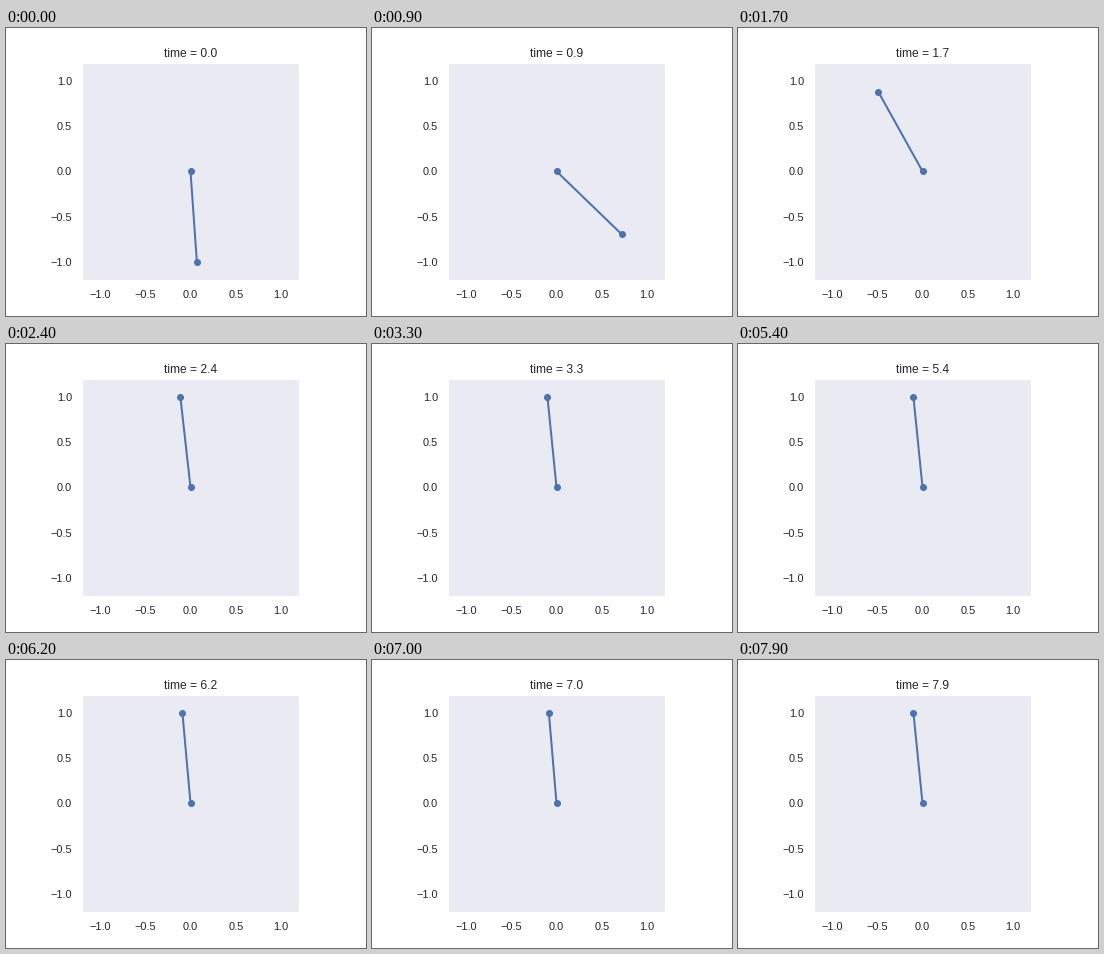
A matplotlib script for the animation above (8000 ms loop, 360 by 288 pixels).

```python
import numpy as np
import matplotlib.pyplot as plt
from matplotlib.animation import FuncAnimation

FRAMES, STEP = 80, 0.1          # seconds per frame
GRAVITY, TORQUE = 11.0, -2.2
CATCH = 1.7                     # time at which the rod is caught near the top
INK = "0.15"

plt.rcParams.update({
    "font.family": "Liberation Sans",
    "text.color": INK,
    "axes.facecolor": "#EAEAF2",
    "axes.edgecolor": "white",
    "axes.linewidth": 1.25,
    "axes.titlesize": 12,
    "axes.titlepad": 6,
})


def swing(theta=0.07, omega=5.77, sub=200):
    """Angles from the bottom, one per frame, under constant torque."""
    angles = [theta]
    dt = STEP / sub
    for _ in range(round(CATCH / STEP)):
        for _ in range(sub):
            acc = TORQUE - GRAVITY * np.sin(theta)
            theta += omega * dt + acc * dt * dt / 2
            omega += (acc + TORQUE - GRAVITY * np.sin(theta)) * dt / 2
        angles.append(theta)
    return angles


def balance(t):
    """Settle just left of upright, with a small wobble."""
    dt = t - CATCH
    lean = 0.097 + 0.37 * np.exp(-dt / 0.155)
    wobble = 0.013 * np.cos(2 * np.pi * (t - 7) / 0.7) * (1 - np.exp(-dt / 0.3))
    return lean - wobble - np.pi


path = swing()

fig, ax = plt.subplots(figsize=(5, 4), dpi=72, facecolor="white")
fig.subplots_adjust(left=0.125, right=0.9, bottom=0.125, top=0.88)
ax.set(xlim=(-1.2, 1.2), ylim=(-1.2, 1.2), aspect="equal")
ticks = np.linspace(-1, 1, 5)
ax.set_xticks(ticks)
ax.set_yticks(ticks)
ax.tick_params(length=6, pad=3.5, labelsize=11, labelcolor=INK,
               bottom=False, left=False)

rod, = ax.plot([], [], "o-", color="#4C72B0", lw=2, ms=6)
title = ax.set_title("time = 0.0")


def update(i):
    t = i * STEP
    theta = path[i] if i < len(path) else balance(t)
    rod.set_data([0, np.sin(theta)], [0, -np.cos(theta)])
    title.set_text(f"time = {t:.1f}")
    return rod, title


anim = FuncAnimation(fig, update, frames=FRAMES, interval=100,
                     repeat=True, repeat_delay=0, blit=False)
plt.show()
```
